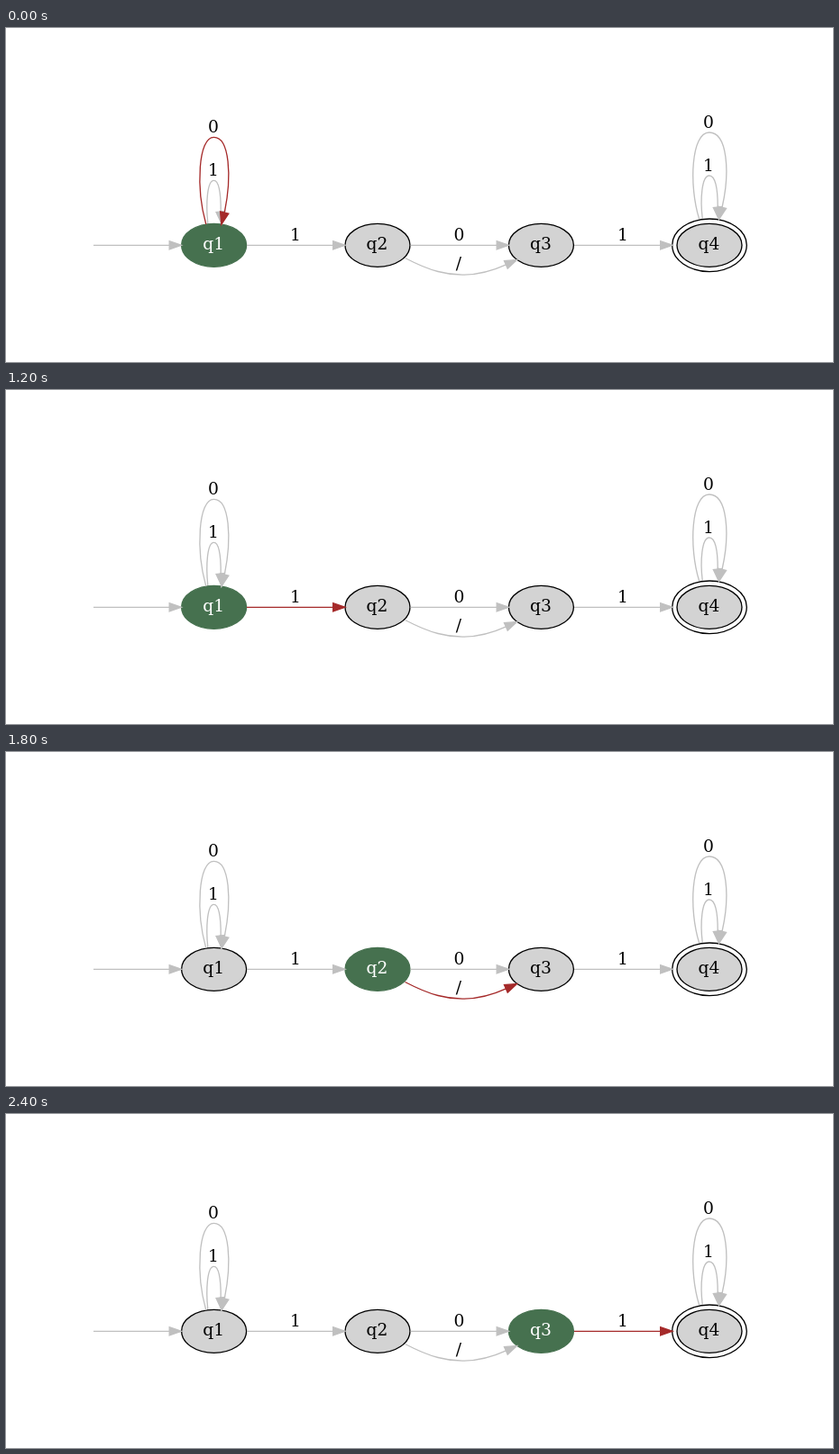
These frames come from a looping animation (917x371 px, 3000 ms). An HTML page:

```html
<!DOCTYPE html>
<html lang="en">
<head>
<meta charset="utf-8">
<title>State machine</title>
<style>
  html, body { margin: 0; width: 100%; height: 100%; overflow: hidden; background: #fff; }
  svg { display: block; }
  text { font: 18.67px "DejaVu Serif", serif; text-anchor: middle; }
  .edge { stroke: #c0c0c0; fill: #c0c0c0; stroke-width: 1.33; }
  .edge path { fill: none; }
  .edge.on { stroke: #a52a2a; fill: #a52a2a; }
  .node ellipse { fill: #d3d3d3; stroke: #000; stroke-width: 1.33; }
  .node .ring { fill: none; }
  .node.on ellipse { fill: #46714f; stroke: #46714f; }
  .node.on text { fill: #fff; }
</style>
</head>
<body>
<svg id="stage" width="917" height="371" viewBox="0 0 917 371"></svg>
<script>
const stage = document.getElementById('stage');
const Y = 241.3;

function add(parent, tag, attrs, text) {
  const el = document.createElementNS('http://www.w3.org/2000/svg', tag);
  for (const key in attrs) el.setAttribute(key, attrs[key]);
  if (text) el.textContent = text;
  return parent.appendChild(el);
}

// Arrowhead from the line's end (bx, by) to its tip (tx, ty).
function edge(d, bx, by, tx, ty, label, lx, ly) {
  const g = add(stage, 'g', { class: 'edge' });
  add(g, 'path', { d });
  const nx = (by - ty) * 0.35, ny = (tx - bx) * 0.35;
  add(g, 'polygon', { points: [bx + nx, by + ny, tx, ty, bx - nx, by - ny] });
  if (label) add(stage, 'text', { x: lx, y: ly }, label);
  return g;
}

function straight(from, tip, label) {
  const base = tip - 13.3;
  return edge(`M${from},${Y}H${base}`, base, Y, tip, Y, label, (from + tip) / 2 - 0.5, 236);
}

function node(x, label, final) {
  const g = add(stage, 'g', { class: 'node' });
  add(g, 'ellipse', { cx: x, cy: Y, rx: 36, ry: 24 });
  if (final) add(g, 'ellipse', { class: 'ring', cx: x, cy: Y, rx: 41.3, ry: 29.3 });
  add(g, 'text', { x: x - 0.5, y: 246.2 }, label);
  return g;
}

const q1 = node(230.6, 'q1');
const q2 = node(412, 'q2');
const q3 = node(593.4, 'q3');
node(780, 'q4', true);

straight(97, 194.5);
edge('M223.8,217C221.5,195 223,169.3 230.5,169.3C235.5,169.3 238.4,181 238.2,204',
  237.7, 204, 239, 217.4, '1', 230, 164);
const loop = edge('M221.8,218C210.5,178 213,121.3 230.5,121.3C248,121.3 250.5,165 242.3,205',
  242.2, 205, 238.8, 218.2, '0', 230, 116);
const step1 = straight(267, 376, '1');
straight(448.5, 557.5, '0');
const slash = edge('M442.5,255.5C455,262 467,267.5 479,270.5C503,277 528,275 554.5,262.8',
  554.3, 262.9, 566.5, 257.6, '/', 502, 268);
const step2 = straight(630, 739, '1');
edge('M772.3,212C769.5,190 771.5,164 779.8,164C786.5,164 789.3,178 789.2,199',
  789, 199, 790.4, 212.4, '1', 779, 159);
edge('M768.6,212C757,175 759.7,116 779.8,116C800,116 802.9,160 794.1,199',
  794, 199.3, 790.7, 212.4, '0', 779, 111);

const steps = [[q1, loop], [q1, step1], [q2, slash], [q3, step2]];
const starts = [0, 1200, 1800, 2400];
let current = -1;

function draw() {
  const t = performance.now() % 3000;
  const next = starts.filter(s => s <= t).length - 1;
  if (next !== current) {
    current = next;
    document.querySelectorAll('.on').forEach(el => el.classList.remove('on'));
    steps[next].forEach(el => el.classList.add('on'));
  }
  requestAnimationFrame(draw);
}
draw();
</script>
</body>
</html>
```
